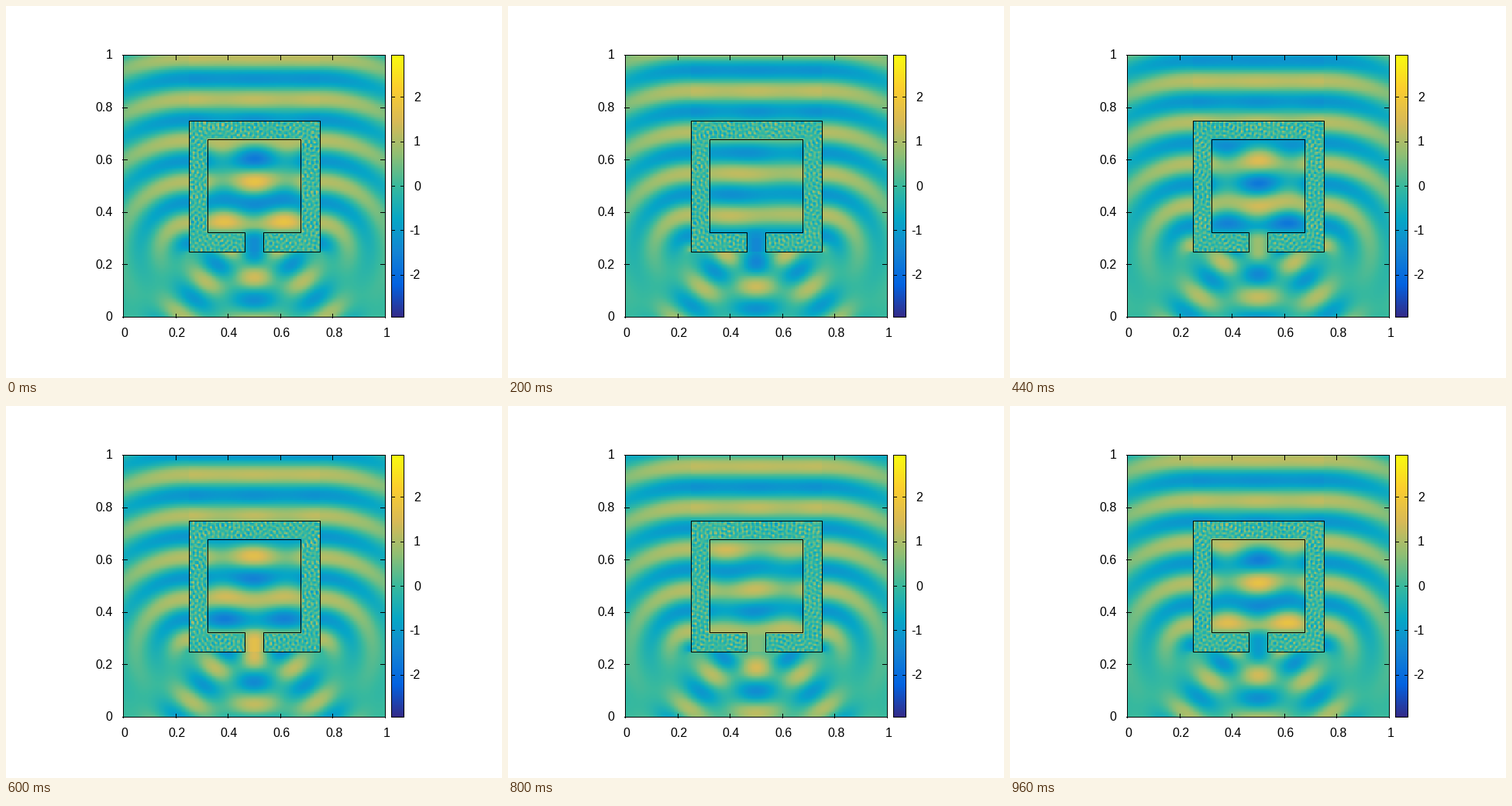
These frames come from a looping animation (640x480 px, 1000 ms). A matplotlib script:

```python
import numpy as np
import matplotlib.pyplot as plt
from matplotlib.animation import FuncAnimation
from matplotlib.colors import LinearSegmentedColormap

DPI, FRAMES, INTERVAL = 100, 25, 40
LEFT, RIGHT, TOP, BOTTOM = 151.5, 489.5, 63.5, 401.5
SIZE = RIGHT - LEFT
K = 40.0          # wavenumber outside the obstacle
PHASE = -1.82     # phase of the incident wave at the bottom edge
VMAX = 2.95
GRID = 200

PARULA = LinearSegmentedColormap.from_list("parula", [
    "#352a87", "#0363e1", "#1485d4", "#06a7c6", "#38b99e",
    "#92bf73", "#d9ba56", "#fcce2e", "#f9fb0e"], N=512)

plt.rcParams["font.family"] = "Liberation Sans"

centers = (np.arange(GRID) + 0.5) / GRID
x, y = np.meshgrid(centers, centers[::-1])
xc, yc = x - 0.5, y - 0.5


def cycles(turns):
    return np.exp(2j * np.pi * turns)


def to_px(u, v):
    return LEFT + SIZE * np.asarray(u), BOTTOM - SIZE * np.asarray(v)


def shadow_wave():
    """Wave that leaves the front face upward and curls around its corners."""
    across = np.maximum(np.abs(xc) - 0.25, 0)
    along = y - 0.25
    r = np.hypot(across, along)
    angle = np.arctan2(across, along)
    amp = 1.1 * np.cos(angle / 2) ** 2.5 * np.exp(-(across / 0.33) ** 2)
    above = np.maximum(y - 0.75, 0)
    ripple = 0.3 * np.exp(-above / 0.12) * (1 - np.cos(2 * np.pi * xc / 0.237)) / 2
    amp = np.where((above > 0) & (across == 0), amp * (1.1 - ripple), amp)
    return amp * np.exp(1j * (K * (0.25 + r) + PHASE))


def beam(ox, oy, dx, dy, amp, crest, wavelength, width, spread, near=0):
    """Widening Gaussian beam; lengths along it are in pixels."""
    s = SIZE * ((x - ox) * dx + (y - oy) * dy)
    n = SIZE * ((x - ox) * dy - (y - oy) * dx)
    ahead = np.maximum(s, 0)
    sigma = width + spread * ahead
    path = np.hypot(ahead, near) - np.hypot(crest, near)
    bend = n ** 2 / (2 * (ahead + 60))
    envelope = amp * np.sqrt(width / sigma) * np.exp(-0.5 * (n / sigma) ** 2)
    return envelope * cycles((path + bend) / wavelength)


def ring_texture(waves=26, length=0.017):
    """Short random standing waves inside the dense material."""
    rng = np.random.default_rng(7)
    total = np.zeros_like(x, dtype=complex)
    for angle in np.pi * (np.arange(waves) + rng.random(waves)) / waves:
        phase = (x * np.cos(angle) + y * np.sin(angle)) / length
        a, b = rng.normal(size=2) + 1j * rng.normal(size=2)
        total += a * cycles(phase) + b * cycles(-phase)
    return 0.55 * total / np.sqrt(np.mean(np.abs(total) ** 2))


def complex_field():
    inner = (np.abs(xc) < 0.178) & (np.abs(yc) < 0.178)
    gap = (np.abs(xc) < 0.035) & (y > 0.25) & (y <= 0.322)
    outer = (np.abs(xc) < 0.25) & (np.abs(yc) < 0.25)
    below = y <= 0.25

    # Waves sent back below the obstacle.
    center = beam(0.5, 0.253, 0, -1, 1.7, 34, 55, 12, 0.16, near=16)
    sides = sum(beam(0.5 + side * 0.102, 0.259, side * 0.56, -0.83,
                     1.25, 50, 53, 15, 0.08) for side in (-1, 1))
    field = shadow_wave() + np.where(below, center + sides, 0)

    # Cavity: plane wave plus three resonances.
    cx, cy = np.pi * xc / 0.356, np.pi * yc / 0.356
    cavity = (np.exp(1j * (K * y + PHASE))
              + 0.70 * cycles(0.97) * np.cos(3 * cx) * np.cos(3 * cy)
              + 0.30 * np.cos(cx) * np.sin(4 * cy)
              - 0.20 * cycles(0.30) * np.sin(2 * cx) * np.sin(4 * cy))
    mix = np.clip((0.345 - y) / 0.05, 0, 1) * np.exp(-(xc / 0.045) ** 4)
    inside = cavity * (1 - mix) * np.clip((y - 0.25) / 0.07, 0, 1) + center * mix

    field = np.where(outer, ring_texture(), field)
    return np.where(inner | gap, inside, field)


field = complex_field()

fig = plt.figure(figsize=(640 / DPI, 480 / DPI), dpi=DPI, facecolor="white")
ax = fig.add_axes([0, 0, 1, 1])
ax.axis("off")


def line(px, py):
    """One-pixel line through pixel centres."""
    ax.plot(np.floor(px) + 0.5, np.floor(py) + 0.5, color="black", lw=0.72,
            snap=False, solid_capstyle="projecting", solid_joinstyle="miter",
            zorder=3)


def box(x0, x1):
    line([x0, x1, x1, x0, x0], [TOP, TOP, BOTTOM, BOTTOM, TOP])


def label(px, py, text, align):
    ax.text(px, py, text, ha=align, va="baseline", fontsize=11.52, color="black")


def heatmap(data, x0, x1):
    extent = (x0 - 0.5, x1 + 0.5, BOTTOM + 0.5, TOP - 0.5)
    return ax.imshow(data, extent=extent, cmap=PARULA, vmin=-VMAX, vmax=VMAX,
                     interpolation="nearest", aspect="auto", zorder=1)


image = heatmap(field.real, LEFT, RIGHT)
heatmap(np.linspace(VMAX, -VMAX, 339)[:, None], 497.5, 513.5)
ax.set_xlim(0, 640)
ax.set_ylim(480, 0)

box(LEFT, RIGHT)
box(497.5, 513.5)

for value in np.arange(6) / 5:
    px, py = to_px(value, value)
    line([px, px], [397, 402])
    line([px, px], [63, 69])
    line([150, 156], [py, py])
    line([483, 489], [py, py])
    label(px + 1.2, 427, f"{value:g}", "center")
    label(137.3, py + 5, f"{value:g}", "right")

for value in range(-2, 3):
    py = (TOP + BOTTOM) / 2 - value * SIZE / (2 * VMAX)
    line([497, 501], [py, py])
    line([509, 513], [py, py])
    label(534.8, py + 5, str(value), "right")

a, b, g = 0.25, 0.322, 0.465
line(*to_px([g, a, a, 1 - a, 1 - a, 1 - g, 1 - g, 1 - b, 1 - b, b, b, g, g],
            [a, a, 1 - a, 1 - a, a, a, b, b, 1 - b, 1 - b, b, b, a]))


def update(frame):
    image.set_data((field * cycles(-frame / FRAMES)).real)
    return [image]


anim = FuncAnimation(fig, update, frames=FRAMES, interval=INTERVAL,
                     repeat=True, repeat_delay=0, blit=False)
plt.show()
```
